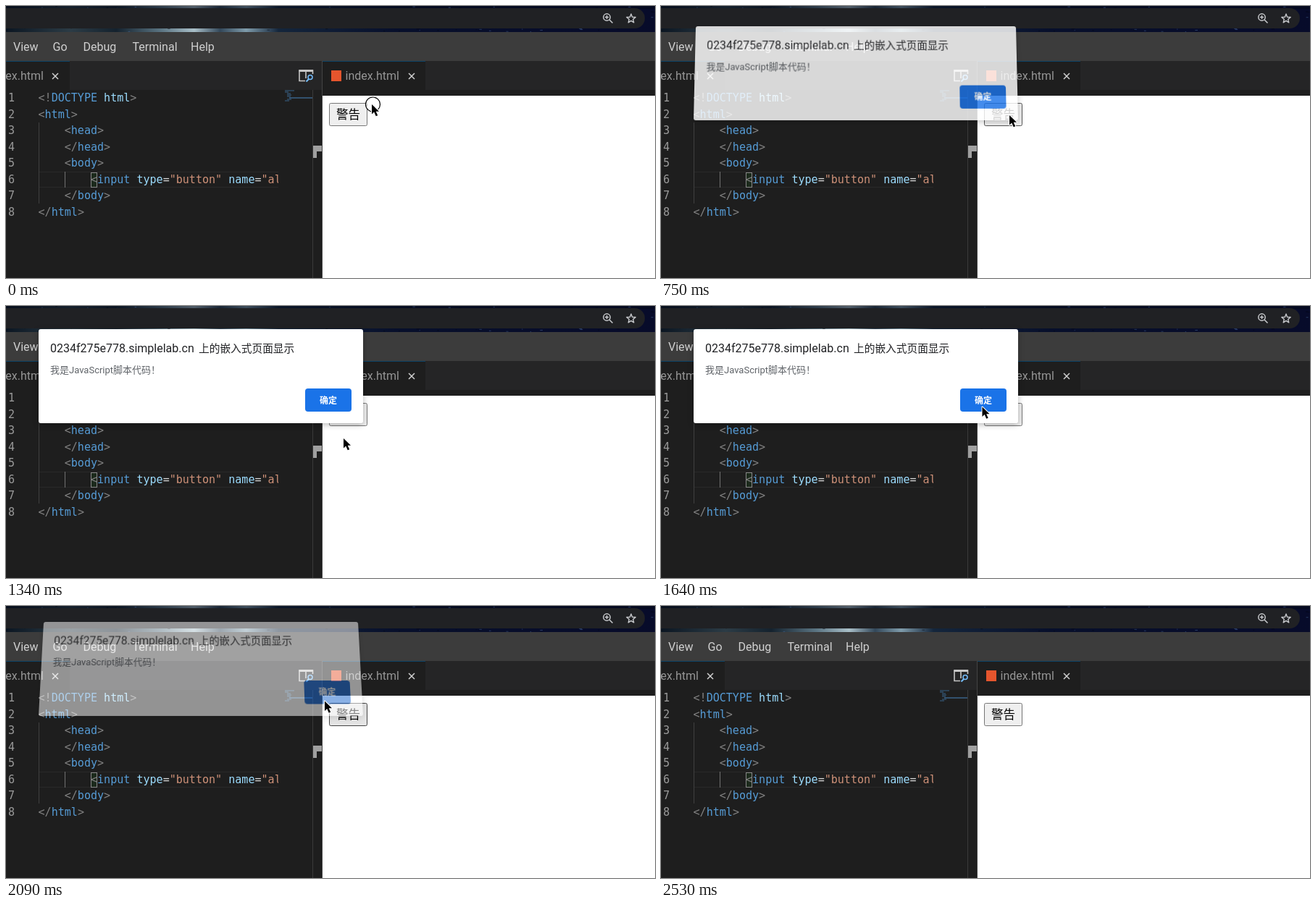
An HTML page that plays this animation: 896x376 px, repeating every 3280 ms.

```html
<!DOCTYPE html>
<html lang="zh-CN">
<head>
<meta charset="utf-8">
<title>Alert demo</title>
<style>
  html, body { margin: 0; width: 100%; height: 100%; overflow: hidden; background: #1e1e1e; }
  svg { position: absolute; left: 0; top: 0; width: 896px; height: 376px; }
  text { white-space: pre; }
  .ui { font: 16px Roboto, sans-serif; }
  .code { font: 15.05px "DejaVu Sans Mono", monospace; }
  .cjk { font-family: Roboto, "Noto Sans CJK SC", "Noto Sans CJK", sans-serif; }
  .p { fill: #808080; }
  .t { fill: #569cd6; }
  .a { fill: #9cdcfe; }
  .o { fill: #d4d4d4; }
  .s { fill: #ce9178; }
  #dialog {
    position: absolute; left: 45px; top: 32px; width: 448px; height: 130px;
    background: #fff; border-radius: 3px; transform-origin: 50% 100%;
    box-shadow: 0 2px 8px rgba(0, 0, 0, .28);
  }
  #dialog svg { width: 448px; height: 130px; }
</style>
</head>
<body>
<svg viewBox="0 0 896 376">
  <defs>
    <linearGradient id="sky">
      <stop offset="0" stop-color="#0b1622"/>
      <stop offset=".1" stop-color="#2c3c46"/>
      <stop offset=".17" stop-color="#14222e"/>
      <stop offset=".24" stop-color="#5c7684"/>
      <stop offset=".29" stop-color="#a9bfc8"/>
      <stop offset=".33" stop-color="#33485a"/>
      <stop offset=".37" stop-color="#7f9cab"/>
      <stop offset=".42" stop-color="#14263c"/>
      <stop offset=".6" stop-color="#070f2b"/>
      <stop offset="1" stop-color="#070b2a"/>
    </linearGradient>
    <clipPath id="pane"><path d="M0 116H376V376H0z"/></clipPath>
  </defs>

  <!-- browser bar -->
  <path fill="url(#sky)" d="M0 0H896V36H0z"/>
  <path fill="#050a18" opacity=".55" d="M0 0H896V4H0z"/>
  <g id="stars"></g>
  <rect x="-20" y="3" width="902" height="28" rx="14" fill="#202124"/>
  <g fill="none" stroke="#c6c8cb" stroke-width="1.5">
    <circle cx="829.5" cy="15.5" r="4.7"/>
    <path d="M833 19l4.5 4.5M827 15.5h5M829.5 13v5"/>
    <path id="star" stroke-width="1.4" stroke-linejoin="round"/>
  </g>

  <!-- menu and tabs -->
  <path fill="#3c3c3c" d="M0 36H896V76H0z"/>
  <g class="ui" fill="#d0d0d0" id="menu"></g>
  <path fill="#252526" d="M0 76H896V116H0z"/>
  <path fill="#1e1e1e" d="M0 76H88V116H0zM437 76H579V116H437z"/>
  <path fill="#0c4266" d="M0 76H88V77H0zM437 76H579V77H437z"/>
  <g class="ui" fill="#969696">
    <text x="-22.5" y="102">index.html</text>
    <text x="468.5" y="102">index.html</text>
  </g>
  <path stroke="#d0d0d0" stroke-width="1.5" d="M64 93l8 8m0-8l-8 8M556 93l8 8m0-8l-8 8"/>
  <rect x="449" y="89" width="14" height="15" fill="#e5552d"/>
  <g fill="none" stroke="#c5c5c5">
    <path stroke-width="1.6" d="M413 103.500H405V89H423.500V94M414 89V100"/>
    <path stroke-width="3" d="M404.500 89.500H424"/>
    <circle cx="420" cy="98.500" r="3" stroke="#75beff" stroke-width="1.5"/>
    <path stroke="#75beff" stroke-width="2" d="M418 101l-3.500 3.500"/>
  </g>

  <!-- editor -->
  <path fill="none" stroke="#292929" d="M45 229.500H376M45 250.500H376"/>
  <path stroke="#404040" d="M45.500 161V273"/>
  <path stroke="#707070" d="M81.500 229V251"/>
  <rect x="117.500" y="230.500" width="8" height="20" fill="#1c2a1c" stroke="#888"/>
  <g class="code" id="code" clip-path="url(#pane)"></g>
  <g stroke="#3f6f9c" stroke-width="1.2" opacity=".85">
    <path d="M385 117h13M385 119h5M388 121h5M388 123h6M388 125h5M388 129h6M385 131h6"/>
    <path d="M391 127H423" stroke-width="1.500"/>
  </g>
  <path stroke="#3a3a3a" d="M423.500 116V376"/>
  <path fill="#a0a0a0" d="M424 193H436V201H429V210H424z"/>
  <path stroke="#444" d="M436.500 76V376"/>

  <!-- preview -->
  <path fill="#1e1e1e" d="M437 116H896V124H437z"/>
  <path fill="#fff" d="M437 124H896V376H437z"/>
  <rect id="button" x="446.500" y="134.500" width="52" height="31" rx="2"/>
  <text class="cjk" x="472.500" y="156" font-size="16.500" text-anchor="middle">警告</text>
</svg>

<div id="dialog">
  <svg class="cjk" viewBox="0 0 448 130">
    <text x="16" y="32" font-size="16" fill="#202124">0234f275e778.simplelab.cn</text>
    <text x="221" y="32" font-size="14.700" fill="#202124">上的嵌入式页面显示</text>
    <text x="16" y="61" font-size="13" fill="#5f6368">我是JavaScript脚本代码！</text>
    <rect id="ok" x="368" y="82" width="64" height="32" rx="4"/>
    <text x="400" y="102.500" font-size="12" font-weight="700" fill="#fff" text-anchor="middle">确定</text>
  </svg>
</div>

<svg viewBox="0 0 896 376">
  <g id="pointer">
    <g id="ring" fill="none">
      <circle cx="1.500" r="9" stroke="#fff" stroke-width="1.500"/>
      <circle cx="1.500" r="10" stroke="#000" stroke-width="1.200"/>
    </g>
    <path d="M0 0V13.500L3.200 10.600L5.700 16.300L8.200 15.200L5.700 9.700H10z" stroke="#fff" stroke-width="2" paint-order="stroke" stroke-linejoin="round"/>
  </g>
</svg>

<script>
const $ = id => document.getElementById(id);
const LOOP = 3280;

// Static parts built from short tables
$('menu').innerHTML = [['View', 10], ['Go', 64.5], ['Debug', 106.5], ['Terminal', 174.5], ['Help', 255]]
  .map(([label, x]) => `<text x="${x}" y="62">${label}</text>`).join('');

const escape = s => s.replace(/</g, '&lt;');
const tag = (name, close = '') => [['p', '<' + close], ['t', name], ['p', '>']];
const lines = [
  [0, [['p', '<!'], ['t', 'DOCTYPE'], ['a', ' html'], ['p', '>']]],
  [0, tag('html')],
  [4, tag('head')],
  [4, tag('head', '/')],
  [4, tag('body')],
  [8, [['p', '<'], ['t', 'input'], ['a', ' type'], ['o', '='], ['s', '"button"'],
       ['a', ' name'], ['o', '='], ['s', '"alert"']]],
  [4, tag('body', '/')],
  [0, tag('html', '/')]
];
$('code').innerHTML = lines.map(([indent, tokens], i) => {
  const y = 132 + i * 22.5;
  const spans = tokens.map(([cls, s]) => `<tspan class="${cls}">${escape(s)}</tspan>`).join('');
  return `<text x="3" y="${y}" fill="#9a9a9a">${i + 1}</text>` +
         `<text x="${44.5 + indent * 9.06}" y="${y}">${spans}</text>`;
}).join('');

$('star').setAttribute('d', 'M' + Array.from({ length: 10 }, (_, i) => {
  const r = i % 2 ? 2.8 : 6.5, a = (i / 5 - .5) * Math.PI;
  return `${(863 + r * Math.cos(a)).toFixed(1)} ${(17.5 + r * Math.sin(a)).toFixed(1)}`;
}).join('L') + 'z');

let seed = 7;
const random = () => (seed = seed * 16807 % 2147483647) / 2147483647;
$('stars').innerHTML = Array.from({ length: 160 }, () =>
  `<rect x="${random() * 896}" y="${random() * 36}" width="${1 + random() * 3}" height="1" ` +
  `fill="${random() < .5 ? '#02050f' : '#48689c'}" opacity=".5"/>`).join('');

// Each step: start time, then whatever changes at that time
const steps = [
  [0, { at: [505, 136], ring: true, fill: '#efefef', border: '#767676', dialog: null, ok: '#1a73e8' }],
  [150, { at: [494, 147], ring: false }],
  [300, { at: [480.5, 152], fill: '#e5e5e5' }],
  [450, { at: [481, 151] }],
  [600, { ring: true, fill: '#f5f5f5' }],
  [750, { ring: false, fill: '#efefef', border: '#555', dialog: { lift: 4, top: .9866, opacity: .82 } }],
  [890, { at: [480, 180], border: '#767676', dialog: { lift: 0, top: 1, opacity: 1 } }],
  [1040, { at: null }],
  [1340, { at: [466, 183] }],
  [1490, { at: [448.5, 151.5] }],
  [1640, { at: [443.5, 139.5] }],
  [1790, { at: [439.5, 133] }],
  [1940, { at: [440, 132], ring: true, ok: '#3f7fd9' }],
  [2090, { at: [440, 131.5], ring: false, fill: '#e5e5e5', border: '#444', ok: '#1a66cc',
           dialog: { lift: 10, top: .9687, opacity: .52 } }],
  [2230, { fill: '#efefef', border: '#767676', dialog: null }],
  [2380, { at: [684.5, 279.5] }],
  [2530, { at: null }]
];

// Tilts the panel away at its top edge while keeping its height
function tilt({ lift, top }) {
  const depth = 1 / top;
  const g = (depth - 1) / 130;
  return `translateY(${-lift}px) matrix3d(1,0,0,0, 0,${depth},0,${-g}, 0,0,1,0, 0,0,0,1)`;
}

function draw(time) {
  const state = Object.assign({}, ...steps.filter(([start]) => start <= time).map(([, change]) => change));
  const { at, ring, fill, border, dialog, ok } = state;
  $('pointer').style.display = at ? '' : 'none';
  if (at) $('pointer').setAttribute('transform', `translate(${at})`);
  $('ring').style.display = ring ? '' : 'none';
  $('button').setAttribute('fill', fill);
  $('button').setAttribute('stroke', border);
  $('ok').setAttribute('fill', ok);
  const panel = $('dialog').style;
  panel.display = dialog ? '' : 'none';
  if (dialog) {
    panel.opacity = dialog.opacity;
    panel.transform = dialog.top === 1 ? 'none' : tilt(dialog);
  }
}

const begin = performance.now();
function tick() {
  draw((performance.now() - begin) % LOOP);
  requestAnimationFrame(tick);
}
tick();
</script>
</body>
</html>
```
